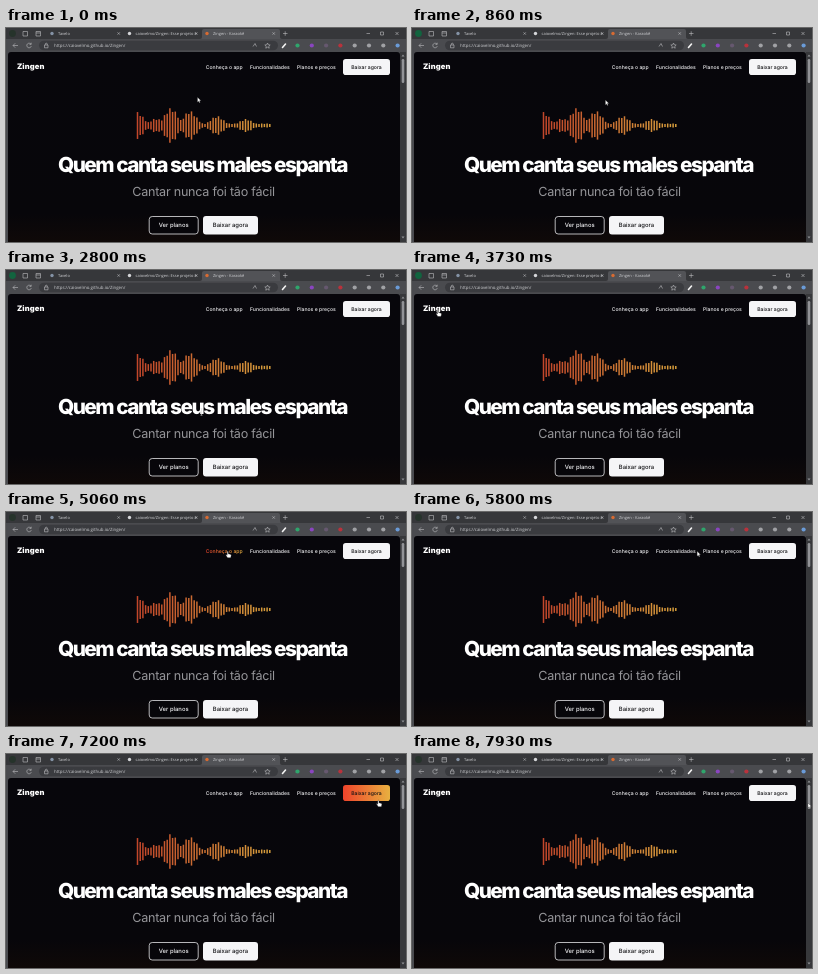
These frames come from a looping animation (400 by 214 pixels, 8000 ms). An HTML page:

```html
<!DOCTYPE html>
<html lang="pt-BR">
<head>
<meta charset="utf-8">
<title>Zingen - Karaokê</title>
<style>
  html, body { margin: 0; width: 100%; height: 100%; overflow: hidden; background: #36373a; }
  svg { display: block; width: 100%; height: 100%; }
  text { font-family: Inter, sans-serif; font-optical-sizing: none; text-rendering: geometricPrecision; }
  .chrome { font-family: "Open Sans", sans-serif; fill: #cfd0d3; }
  .icon { fill: none; stroke: #bcbdc0; stroke-width: .6; }
  .link { font-size: 5.1px; font-weight: 500; fill: #f2f2f4; }
  .button { fill: #f5f5f7; }
  .hover { fill: url(#warm); }
  .label { font-weight: 500; fill: #111114; text-anchor: middle; }
  .light { fill: #f5f5f7; }
</style>
</head>
<body>
<svg viewBox="0 0 400 214">
  <defs>
    <linearGradient id="warm"><stop stop-color="#ee432b"/><stop offset="1" stop-color="#e8b040"/></linearGradient>
    <linearGradient id="wave" gradientUnits="userSpaceOnUse" x1="130" x2="266" y1="0" y2="0">
      <stop stop-color="#c2452a"/><stop offset="1" stop-color="#d8a03c"/>
    </linearGradient>
    <linearGradient id="night" x2="0" y2="1">
      <stop stop-color="#07060b"/><stop offset=".85" stop-color="#07060a"/><stop offset="1" stop-color="#0f0908"/>
    </linearGradient>
  </defs>

  <g id="browser">
    <rect width="400" height="214" fill="#36373a"/>
    <rect y="11" width="400" height="203" fill="#4a4b4f"/>
    <path d="M194 11q2 0 2-2V3q0-2 2-2h74q2 0 2 2v6q0 2 2 2z" fill="#525357"/>
    <rect x="33" y="12.7" width="239" height="9.6" rx="4.8" fill="#3a3b3f"/>
    <circle id="avatar" cx="6.5" cy="5.5" r="3.4"/>
    <path class="icon" d="M17 3.5h4.500v4.500H17zM30 3.500h4.500v4.500H30zM30 5h4.500M277 5.500h4.500M279.200 3.300v4.500M360.500 5.500h3.500M374.500 4h3v3h-3zM389.500 4l3 3m0-3l-3 3"/>
    <path class="icon" d="M12 17.500H7m2.200-2.200L7 17.500l2.200 2.200M25 16.200a2.300 2.300 0 1 0 .3 2M25.200 14.700v1.700h-1.700M38.500 17H42v2.800h-3.500zM39.300 17v-.8a1 1 0 0 1 2 0v.8"/>
    <path class="icon" d="M247 18.500l2-3 1.500 3M261.500 15l.8 1.800 1.900.2-1.400 1.300.4 1.900-1.700-1-1.700 1 .4-1.900-1.400-1.300 1.900-.2z"/>
    <path class="icon" stroke-linecap="round" d="M276.500 19.500l3-3.500" style="stroke:#f4f4f4;stroke-width:1.600"/>
  </g>

  <path d="M2 214V27q0-3 3-3h386q3 0 3 3v187z" fill="url(#night)"/>
  <rect x="394" y="24" width="6" height="190" fill="#37383b"/>
  <rect x="395.700" y="31" width="2.600" height="24" rx="1.300" fill="#929397"/>
  <path d="M395.500 28.500l1.500-2 1.500 2zM395.500 208.500l1.500 2 1.500-2z" fill="#929397"/>
  <text x="11" y="41.200" font-size="7.600" font-weight="900" letter-spacing=".1" fill="#fff">Zingen</text>
  <g id="nav"></g>
  <g id="bars" stroke="url(#wave)" stroke-width="1.500"></g>
  <text x="196.500" y="143.600" font-size="20.800" font-weight="800" letter-spacing="-1.500" text-anchor="middle" fill="#fff">Quem canta seus males espanta</text>
  <text x="197.500" y="168" font-size="12.600" letter-spacing="-.25" text-anchor="middle" fill="#949498">Cantar nunca foi tão fácil</text>
  <rect x="143.200" y="188.500" width="49" height="17.500" rx="3" fill="#07060a" stroke="#e4e4e6" stroke-width=".8"/>
  <text class="label light" x="167.700" y="199.400" font-size="5.900">Ver planos</text>
  <rect class="button" x="197" y="188" width="55" height="18.500" rx="3"/>
  <text class="label" x="224.500" y="199.400" font-size="5.900">Baixar agora</text>

  <g id="cursor" stroke-linejoin="round">
    <path id="arrow" d="M0 0v5.700l1.300-1.200 .9 2 1-.4-.9-2h1.800z" fill="#fff" stroke="#222" stroke-width=".35"/>
    <path id="beam" d="M-1.200-3.800h2.400M0-3.800v7.600M-1.200 3.800h2.400" fill="none" stroke="#d8d8d8" stroke-width=".7"/>
    <path id="hand" d="M-.7.600Q0-.5.700.600V3l1 .1 1 .3 1 .4q.5.300.4 1.200l-.6 2.700H-.2L-2 5q-.6-1 .2-1.100l1.100.7z" fill="#fff" stroke="#111" stroke-width=".45"/>
  </g>
</svg>

<script>
const LOOP = 8000;
const TRAVEL = 500;
const byId = id => document.getElementById(id);

function add(parent, tag, attrs, content = "") {
  const node = document.createElementNS("http://www.w3.org/2000/svg", tag);
  for (const key in attrs) node.setAttribute(key, attrs[key]);
  node.textContent = content;
  return byId(parent).appendChild(node);
}

// Browser tabs and address
const tabs = [
  ["Tavelo", "#8593a6"],
  ["caiovelmo/Zingen: Esse projeto é", "#d5d6d9"],
  ["Zingen - Karaokê", "#d86b32"]
];
tabs.forEach(([title, fill], i) => {
  const x = 46 + i * 77.5;
  add("browser", "circle", { cx: x, cy: 5.5, r: 1.7, fill });
  add("browser", "text", { class: "chrome", x: x + 6, y: 7.1, "font-size": 4 }, title);
  add("browser", "path", { class: "icon", d: `M${x + 65.5} 4.3l2.400 2.400m0-2.400l-2.400 2.400` });
});
add("browser", "text", { class: "chrome", x: 48, y: 19, "font-size": 4.35 }, "https://caiovelmo.github.io/Zingen/");

// Toolbar buttons at an even pitch
["#2fa56c", "#8a45c0", "#66586f", "#b8323c", "#a0a1a5", "#a0a1a5", "#a0a1a5", "#6a9bd8"].forEach((fill, i) =>
  add("browser", "circle", { cx: 291.5 + i * 14.3, cy: 17.5, r: 2.1, fill }));

// Sound wave: a few swells, with every other bar a little shorter
const swells = [[131, 27], [150, 14], [165, 35], [184, 29], [211, 19], [240, 13]];
for (let i = 0; i < 50; i++) {
  const x = 131.5 + i * 2.7;
  const peak = Math.max(4, ...swells.map(([cx, h]) => h * Math.exp(-(((x - cx) / 9) ** 2))));
  const h = peak * (i % 2 ? 0.8 : 1);
  add("bars", "path", { d: `M${x} ${97.5 - h / 2}v${h}` });
}

// Navigation: left edge, width, label
const targets = [
  [199.8, 38, "Conheça o app"],
  [244, 40, "Funcionalidades"],
  [291, 39, "Planos e preços"]
].map(([x, width, label]) => ({
  x, y: 35, width, height: 9,
  node: add("nav", "text", { class: "link", x, y: 41.2 }, label)
}));
const button = { x: 337, y: 31, width: 47, height: 16 };
targets.push({ ...button, node: add("nav", "rect", { class: "button", rx: 2.8, ...button }) });
add("nav", "text", { class: "label", x: 360.5, y: 41, "font-size": 5.1 }, "Baixar agora");

const logo = { x: 11, y: 34, width: 29, height: 9 };
const heading = { x: 52, y: 126, width: 292, height: 23 };
const subtitle = { x: 126, y: 156, width: 143, height: 15 };

// Pointer stops: arrival time, x, y
const stops = [
  [0, 191.5, 69.3], [1300, 238, 137], [2450, 195.5, 142], [3600, 26, 40],
  [4800, 220, 39.3], [5500, 262, 39.3], [6050, 308, 39.3], [6450, 348.5, 43.5], [7450, 396, 49]
];

function pointerAt(t) {
  const next = stops.findIndex(stop => stop[0] > t);
  if (next < 0) return stops.at(-1).slice(1);
  const [, x0, y0] = stops[next - 1], [arrival, x1, y1] = stops[next];
  const p = Math.max(0, 1 - (arrival - t) / TRAVEL);
  const eased = p * p * (3 - 2 * p);
  return [x0 + (x1 - x0) * eased, y0 + (y1 - y0) * eased];
}

function draw(t) {
  const [x, y] = pointerAt(t);
  const over = box => x >= box.x && x <= box.x + box.width && y >= box.y && y <= box.y + box.height;
  for (const target of targets) target.node.classList.toggle("hover", over(target));

  const shape = [...targets, logo].some(over) ? "hand" : [heading, subtitle].some(over) ? "beam" : "arrow";
  for (const name of ["arrow", "beam", "hand"]) byId(name).style.display = name === shape ? "" : "none";
  byId("cursor").setAttribute("transform", `translate(${x} ${y}) scale(.85)`);
  byId("avatar").setAttribute("fill", t > 460 && t < 3930 ? "#12643f" : "#26332b");
}

const start = performance.now();
function tick() {
  draw((performance.now() - start) % LOOP);
  requestAnimationFrame(tick);
}
tick();
</script>
</body>
</html>
```
